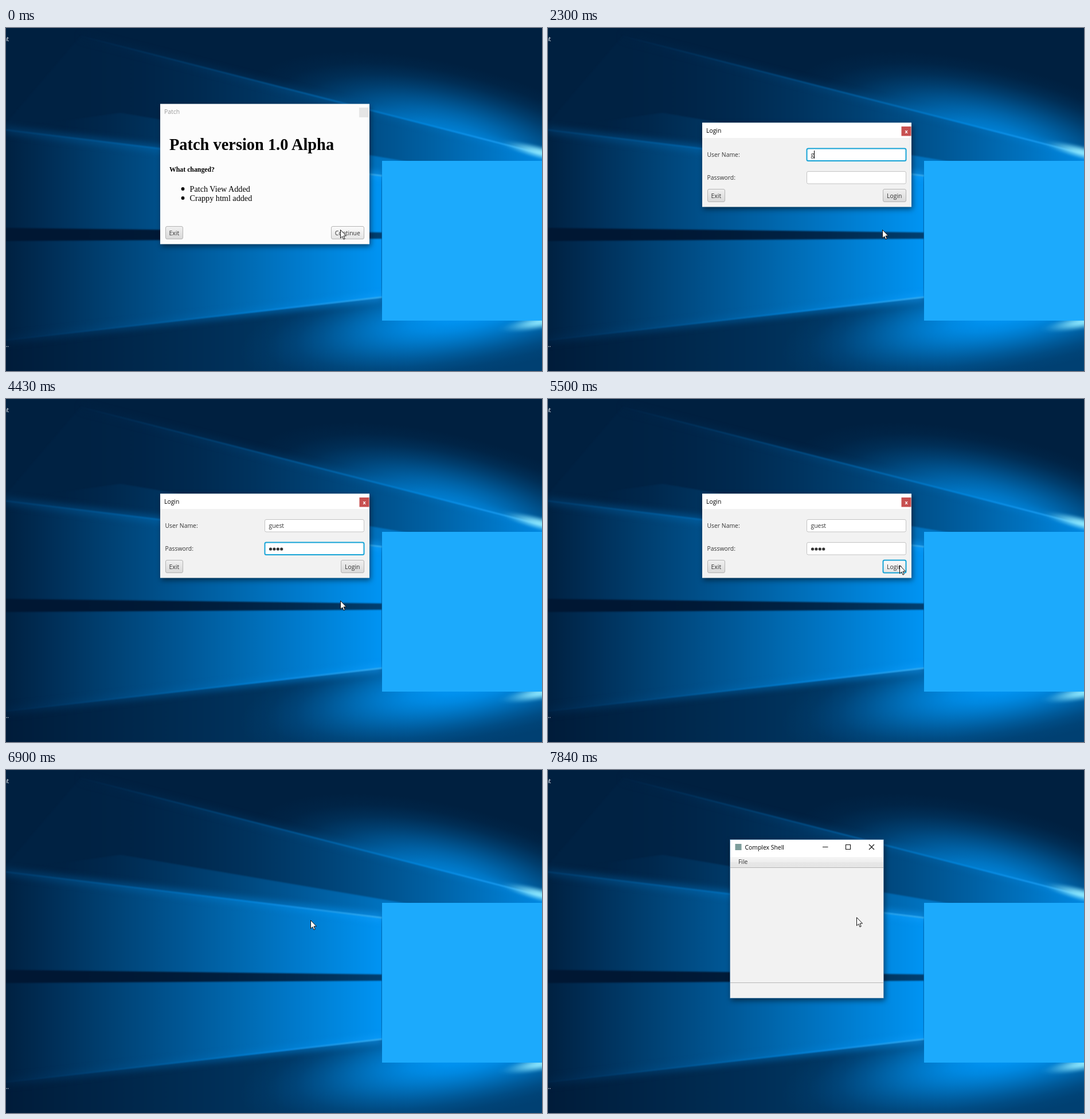
Recreate the animation shown at these times as an HTML page with a canvas. Size 935x599 px, loop 7.99 s.

```html
<!DOCTYPE html>
<html lang="en">
<head>
<meta charset="utf-8">
<title>Login flow</title>
<style>
  html, body { margin: 0; width: 100%; height: 100%; overflow: hidden; background: #001d3c; }
  canvas, svg { position: absolute; left: 0; top: 0; width: 935px; height: 599px; display: block; }
  text { font: 10.4px "Open Sans", "Noto Sans", sans-serif; fill: #333; white-space: pre; }
  .title { fill: #000; }
  .serif text { font-family: "Liberation Serif", "Noto Serif", serif; fill: #000; }
  .win { filter: drop-shadow(2px 4px 5px rgba(0, 0, 0, .5)); }
  #patch { transform-origin: 451.5px 254.5px; }
  #login { transform-origin: 451.5px 238.5px; }
  #shell { transform-origin: 451.5px 260px; }
  .btn rect { fill: url(#face); stroke: #b4b4b4; }
  .btn text { text-anchor: middle; }
  .btn.hover rect { fill: url(#faceHover); }
  .btn.down rect { fill: #d4d8da; }
  .field { fill: #fff; stroke: #c3c3c3; }
  .btn.focus rect, .field.focus { stroke: #16a3d6; stroke-width: 2; }
</style>
</head>
<body>
<canvas id="desk" width="935" height="599"></canvas>
<svg viewBox="0 0 935 599">
  <defs>
    <linearGradient id="face" x2="0" y2="1"><stop stop-color="#f0f0f0"/><stop offset="1" stop-color="#d8d8d8"/></linearGradient>
    <linearGradient id="faceHover" x2="0" y2="1"><stop stop-color="#fbfbfb"/><stop offset="1" stop-color="#e4e4e4"/></linearGradient>
    <linearGradient id="menu" x2="0" y2="1"><stop stop-color="#f5f5f5"/><stop offset=".5" stop-color="#eee"/><stop offset=".5" stop-color="#e7e7e7"/><stop offset="1" stop-color="#e5e5e5"/></linearGradient>
  </defs>

  <text x="5" y="23" text-anchor="end" style="fill:#fff">nt</text>
  <text x="5" y="557" text-anchor="end" style="fill:#fff">...</text>

  <g id="patch" class="win">
    <rect x="269" y="132.5" width="365" height="245" fill="#fcfcfc"/>
    <text x="276" y="150" style="fill:#999">Patch</text>
    <rect x="616" y="139" width="17" height="17" fill="#e6e6e6"/>
    <g class="serif">
      <text x="285" y="213" style="font-size:28.4px;font-weight:700">Patch version 1.0 Alpha</text>
      <text x="285" y="251" style="font-size:11.8px;font-weight:700">What changed?</text>
      <circle cx="308.5" cy="281" r="2.9"/><text x="320.5" y="286" style="font-size:14.2px">Patch View Added</text>
      <circle cx="308.5" cy="297" r="2.9"/><text x="320.5" y="302" style="font-size:14.2px">Crappy html added</text>
    </g>
    <g class="btn"><rect x="278.5" y="346.5" width="30" height="22" rx="2.5"/><text x="293.3" y="361.5">Exit</text></g>
    <g class="btn hover"><rect x="567.5" y="346.5" width="57" height="22" rx="2.5"/><text x="595.7" y="361.5">Continue</text></g>
  </g>

  <g id="login" class="win">
    <rect x="269" y="165.5" width="365" height="147" fill="#f2f2f2"/>
    <rect x="269" y="165.5" width="365" height="26.5" fill="#fff"/>
    <text x="276" y="183" class="title">Login</text>
    <rect x="616.5" y="172" width="17" height="16.5" fill="#c75050"/>
    <text x="625" y="183.5" text-anchor="middle" style="fill:#fff;font-size:9px;font-weight:700">x</text>
    <text x="277.5" y="225">User Name:</text>
    <text x="277.5" y="265">Password:</text>
    <rect id="nameBox" class="field" x="451.5" y="210.5" width="173" height="21.5" rx="2.5"/>
    <rect id="passBox" class="field" x="451.5" y="250.5" width="173" height="21.5" rx="2.5"/>
    <text id="name" x="458.5" y="225"></text>
    <g id="dots" fill="#333"></g>
    <rect id="caret" width="1" height="14" fill="#000"/>
    <g class="btn"><rect x="278.5" y="281.5" width="30" height="22" rx="2.5"/><text x="293.3" y="296.5">Exit</text></g>
    <g class="btn" id="go"><rect x="584.5" y="281.5" width="40" height="22" rx="2.5"/><text x="604.3" y="296.5">Login</text></g>
  </g>

  <g id="shell" class="win">
    <rect x="317.5" y="121.5" width="268" height="277" fill="#f2f2f2" stroke="#3f78a8" stroke-opacity=".6"/>
    <rect x="318" y="122" width="267" height="30" fill="#fff"/>
    <rect x="326.5" y="129" width="11" height="11" fill="#7d9d9b"/>
    <text x="343.5" y="139" class="title">Complex Shell</text>
    <path d="M479 134.5h9.5M519.5 130.5h8v8h-8zM560 130l9 9m0-9l-9 9" fill="none" stroke="#111" stroke-width="1.1"/>
    <rect x="318" y="152" width="267" height="18" fill="url(#menu)"/>
    <text x="332" y="164">File</text>
    <path d="M318 170.5h267M318 371.5h267" stroke="#b6b6b6"/>
  </g>

  <path id="pointer" d="M0 0V14.4L3.3 11.4L5.5 16.6L7.7 15.6L5.5 10.5H10Z" fill="#fff" stroke="#111"/>
</svg>
<script>
const LOOP = 7990;
const $ = id => document.getElementById(id);

// Wallpaper: every tone is one brightness, 0 = night blue, 1 = bright blue, above that whiter
const c = $('desk').getContext('2d');
const shade = (v, a = 1) => `rgba(${Math.max(0, v - 1) * 200},${28 + 120 * v},${58 + 185 * v},${a})`;

function ramp(x0, x1, v0, v1, power = 1) {
  const g = c.createLinearGradient(x0, 0, x1, 0);
  for (let u = 0; u <= 1; u += 1 / 8) g.addColorStop(u, shade(v0 + (v1 - v0) * u ** power));
  return g;
}

function poly(fill, ...points) {
  c.filter = 'blur(1px)';
  c.fillStyle = fill;
  c.beginPath();
  points.forEach(p => c.lineTo(...p));
  c.fill();
  c.filter = 'none';
}

function glow(x, y, rx, ry, tilt, v, alpha) {
  c.save();
  c.translate(x, y);
  c.rotate(tilt);
  c.scale(rx, ry);
  const g = c.createRadialGradient(0, 0, 0, 0, 0, 1);
  for (let u = 0; u <= 1; u += 1 / 8) g.addColorStop(u, shade(v, alpha * (1 + Math.cos(Math.PI * u)) / 2));
  c.fillStyle = g;
  c.fillRect(-1, -1, 2, 2);
  c.restore();
}

function beam(x0, y0, x1, y1, v0, v1, halo) {
  const stroke = (color, width, blur, alpha) => {
    c.filter = `blur(${blur}px)`;
    c.globalAlpha = alpha;
    c.strokeStyle = color;
    c.lineWidth = width;
    c.beginPath();
    c.moveTo(x0, y0);
    c.lineTo(x1, y1);
    c.stroke();
  };
  stroke(ramp(x0, x1, v0, Math.min(v1, 1.1)), 12, 6, halo);
  stroke(ramp(x0, x1, v0, v1), 2.2, .8, .85);
  c.globalAlpha = 1;
  c.filter = 'none';
}

function paintDesk() {
  c.fillStyle = shade(.03);
  c.fillRect(0, 0, 935, 599);
  poly(ramp(0, 700, 0, .3), [-9, 470], [944, 470], [944, 608], [-9, 608]);
  glow(780, 200, 370, 135, .25, .85, 1);
  glow(800, 500, 400, 105, -.18, 1, 1);

  poly(ramp(130, 935, .05, .9, 1.8), [130, 14], [330, 66], [944, 222], [944, 262], [656, 258], [-9, 177]);
  poly(ramp(100, 740, .05, .85, 1.3), [200, 148], [740, 240], [656, 258], [-9, 177]);
  poly(ramp(0, 656, .04, 1), [-9, 177], [656, 258], [656, 470], [-9, 546]);

  beam(130, 14, 935, 220, .05, 1.3, .25);
  beam(0, 178, 656, 258, .3, 1.4, .6);
  beam(0, 545, 656, 470, .1, 1.4, .6);

  poly(ramp(0, 656, -.04, .3, 3), [-9, 349], [656, 357], [656, 368], [-9, 372]);
  glow(935, 218, 80, 14, .25, 1.7, .95);
  glow(935, 513, 80, 16, -.18, 1.7, .95);
  c.fillStyle = '#1caafc';
  c.fillRect(656, 232, 279, 279);
}

// Progress 0..1 in n jumps, the first one at start
const jumps = (t, start, gap, n) => Math.min(1, Math.max(0, Math.floor((t - start) / gap) + 1) / n);

const smooth = u => u * u * u * (u * (6 * u - 15) + 10);
const easeIn = u => u ** 4;
const easeOut = u => 1 - (1 - u) ** 4;

const home = [583, 352];
const moves = [
  { start: 4710, gap: 130, n: 5, ease: smooth, via: [665, 320], to: [613, 290] },
  { start: 6780, gap: 120, n: 2, ease: smooth, via: [572, 276], to: [531, 262] },
  { start: 7050, gap: 120, n: 2, ease: easeOut, via: [574, 264], to: [574, 284] },
  { start: 7570, gap: 135, n: 3, ease: easeIn, via: [560, 286], to: [538, 257] }
];

function pointerAt(t) {
  return moves.reduce((from, m) => {
    const u = m.ease(jumps(t, m.start, m.gap, m.n)), w = 1 - u;
    return from.map((p, i) => w * w * p + 2 * u * w * m.via[i] + u * u * m.to[i]);
  }, home);
}

const opened = (t, start) => 1 - (1 - jumps(t, start, 120, 2)) ** 2;
const closed = (t, start, gap) => 1 - jumps(t, start, gap, 2);

function show(id, alpha) {
  const s = $(id).style;
  s.display = alpha ? '' : 'none';
  s.opacity = alpha;
  s.transform = `scale(${.945 + .055 * alpha})`;
}

// Typing
const userName = 'guest';
const nameKeys = [2300, 2430, 2580, 2580, 2860];
const passKeys = [3420, 3570, 3570, 3720];
const tabKey = 3010, press = 5370, release = 5500;
const caretWakes = [150, ...nameKeys, tabKey, ...passKeys];
const pressed = (keys, t) => keys.filter(k => k <= t).length;

// Solid for a while after each key, then blinking
function caretOn(t) {
  const idle = t - Math.max(...caretWakes.filter(k => k <= t));
  return t < press && (idle < 700 || Math.floor((idle - 700) / 530) % 2 === 1);
}

const dotGap = 6.4;
const dots = passKeys.map((_, i) => {
  const dot = document.createElementNS('http://www.w3.org/2000/svg', 'circle');
  dot.setAttribute('cx', 461.5 + i * dotGap);
  dot.setAttribute('cy', 262);
  dot.setAttribute('r', 2.6);
  return $('dots').appendChild(dot);
});

function render(t) {
  show('patch', closed(t, 140, 150));
  show('login', opened(t, 290) * closed(t, 6780, 120));
  show('shell', opened(t, 7050));

  const typed = pressed(nameKeys, t), hidden = pressed(passKeys, t);
  $('name').textContent = userName.slice(0, typed);
  dots.forEach((d, i) => d.style.display = i < hidden ? '' : 'none');

  const active = t < tabKey ? 'nameBox' : t < press ? 'passBox' : 'go';
  for (const id of ['nameBox', 'passBox', 'go']) $(id).classList.toggle('focus', id === active);
  $('go').classList.toggle('hover', t >= 5100);
  $('go').classList.toggle('down', t >= press && t < release);

  const inName = active === 'nameBox';
  const width = !inName ? hidden * dotGap : typed ? $('name').getComputedTextLength() : 0;
  $('caret').setAttribute('x', Math.round(458.5 + width));
  $('caret').setAttribute('y', inName ? 214 : 254);
  $('caret').style.display = caretOn(t) ? '' : 'none';

  const [x, y] = pointerAt(t).map(v => Math.round(v) + .5);
  $('pointer').setAttribute('transform', `translate(${x} ${y})`);
}

paintDesk();
const start = performance.now();
function tick() {
  render((performance.now() - start) % LOOP);
  requestAnimationFrame(tick);
}
tick();
</script>
</body>
</html>
```
